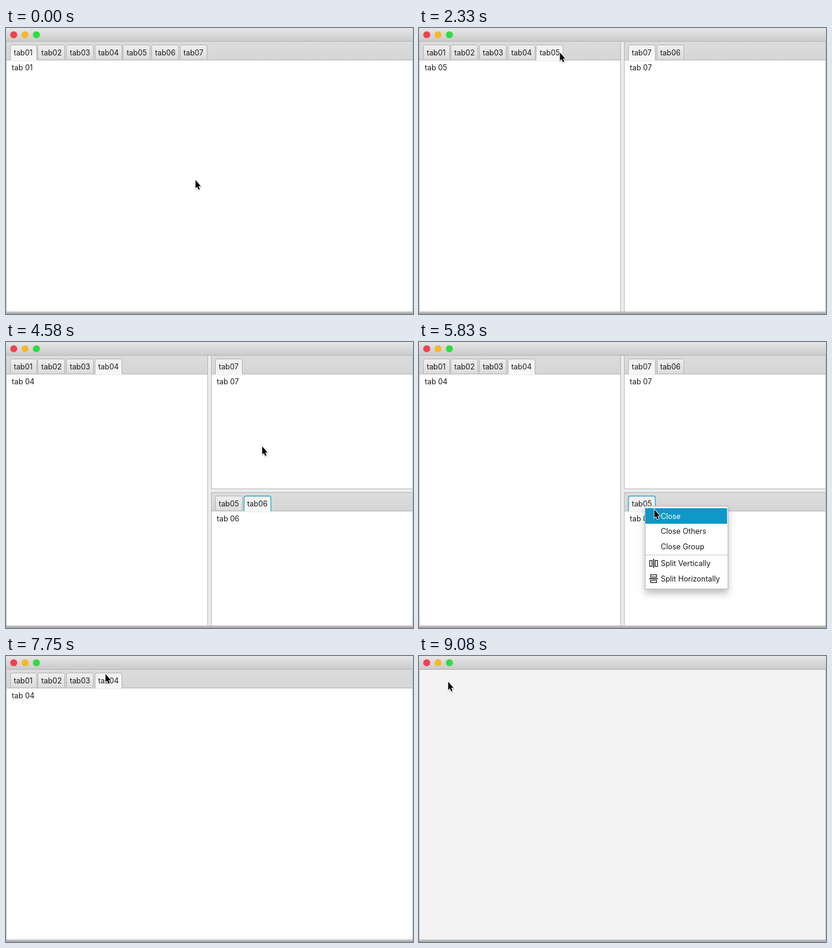
An HTML page with a canvas that plays this animation: 683 px wide and 480 px high, repeating every 9510 ms.

```html
<!DOCTYPE html>
<html lang="en">
<head>
<meta charset="utf-8">
<title>Tab panes</title>
<style>
  html, body { margin: 0; height: 100%; overflow: hidden; background: #fff; }
  canvas { display: block; }
</style>
</head>
<body>
<canvas id="stage" width="683" height="480"></canvas>
<script>
const ctx = document.getElementById('stage').getContext('2d');
const LOOP = 9510, STEP = 1000 / 12, LAST_STEP = 109;
const FONT = '12.45px Inter, sans-serif';
const BLUE = '#0f97c8', EDGE = '#b6b6b6', INK = '#1a1a1a';

const ITEMS = ['Close', 'Close Others', 'Close Group', 'Split Vertically', 'Split Horizontally'];
const rowMiddle = i => 17 + 25.6 * i + (i > 2 ? 2.8 : 0);

// ---- Layout ----

function paneBox(index, count) {
  const x = index ? 344 : 0;
  return {
    x,
    y: index === 2 ? 252 : 22,
    w: count === 1 ? 683 : 339,
    h: index && count > 2 ? 225 : 455
  };
}

function tabSlots(tabs, box) {
  let x = box.x + 7;
  return [...tabs].map(id => {
    const pitch = id === '1' ? 46.3 : 47.7;
    const slot = { id, x, w: pitch - 1.8 };
    x += pitch;
    return slot;
  });
}

// ---- Story: each action changes the state and adds a key for the pointer ----

const keys = [];
let panes = [{ tabs: '1234567', selected: '1' }];
let focus = -1, menu = null;

function move(t, x, y) {
  keys.push({ t, x, y, focus, menu, panes: panes.map(p => ({ ...p })) });
}

function removeTab(pane, id) {
  const at = pane.tabs.indexOf(id);
  pane.tabs = pane.tabs.replace(id, '');
  if (pane.selected === id) pane.selected = pane.tabs[Math.max(0, at - 1)];
}

function press(t, index, id) {
  const box = paneBox(index, panes.length);
  const slot = tabSlots(panes[index].tabs, box).find(s => s.id === id);
  panes[index].selected = id;
  focus = index;
  move(t, slot.x + 24, box.y + 20);
}

function drag(start, end, id, from, to) {
  press(start, from, id);
  const box = paneBox(to, panes.length);
  const x = box.x + 30 + 47.7 * panes[to].tabs.length;
  removeTab(panes[from], id);
  panes[to].tabs += id;
  focus = -1;
  move(end, x, box.y + 20);
}

function openMenu(t, index, id, x, y) {
  focus = index;
  menu = { x, y, id };
  move(t, x, y);
}

function choose(t, item) {
  const { x, y, id } = menu, pane = panes[focus], row = ITEMS.indexOf(item);
  if (item === 'Close Others') {
    pane.tabs = pane.selected = id;
  } else if (item === 'Close Group') {
    pane.tabs = '';
  } else {
    removeTab(pane, id);
    if (item.startsWith('Split')) panes.push({ tabs: id, selected: id });
  }
  panes = panes.filter(p => p.tabs);
  focus = -1;
  menu = null;
  move(t, x + 18, y + rowMiddle(row) - 9);
}

move(0, 318, 256);
openMenu(910, 0, '7', 306, 50);
move(1240, 329, 141);
choose(1410, 'Split Vertically');
drag(1660, 1990, '6', 0, 1);
drag(2410, 2740, '5', 0, 1);
openMenu(2910, 1, '5', 471, 42);
move(3330, 499, 117);
choose(3660, 'Split Horizontally');
drag(3910, 4240, '6', 1, 2);
press(4330, 2, '6');
move(4580, 430, 176);
move(4750, 432, 170);
move(4910, 432, 170);
drag(5080, 5320, '6', 2, 1);
openMenu(5560, 2, '5', 379, 275);
choose(5910, 'Close');
openMenu(6490, 1, '6', 424, 42);
move(6660, 448, 100);
move(6910, 448, 100);
choose(7070, 'Close Group');
move(7740, 167, 31);
openMenu(7910, 0, '4', 165, 35);
choose(8240, 'Close Others');
openMenu(8660, 0, '4', 31, 36);
choose(8990, 'Close');

// ---- Drawing ----

function rect(x, y, w, h, color) {
  ctx.fillStyle = color;
  ctx.fillRect(x, y, w, h);
}

function shade(y0, y1, from, to) {
  const g = ctx.createLinearGradient(0, y0, 0, y1);
  g.addColorStop(0, from);
  g.addColorStop(1, to);
  return g;
}

function label(text, x, middle, color = INK) {
  ctx.fillStyle = color;
  ctx.fillText(text, x, middle + 4.5);
}

function drawWindow() {
  rect(0, 0, 683, 480, '#f3f3f3');
  rect(0, 0, 683, 22, shade(0, 22, '#e6e6e6', '#cbcbcb'));
  rect(0, 22, 683, 1, '#ababab');
  ['#ee4350', '#f5b731', '#30db43'].forEach((color, i) => {
    ctx.fillStyle = color;
    ctx.beginPath();
    ctx.arc(13 + 19 * i, 11.3, 5.9, 0, 7);
    ctx.fill();
  });
}

function drawWindowEdges() {
  rect(0, 22, 1, 455, '#bcbcbc');
  rect(682, 22, 1, 455, '#bcbcbc');
  rect(0, 476, 683, 1, '#aaa');
  rect(0, 477, 683, 3, shade(477, 480, '#d4d4d4', '#929292'));
}

function drawTab({ id, x, w }, y, selected, focused) {
  const bottom = y + (selected ? 25.5 : 24);
  const left = Math.round(x) + 0.5, right = Math.round(x + w) - 0.5;
  ctx.beginPath();
  ctx.moveTo(left, bottom);
  ctx.arcTo(left, y, right, y, 3);
  ctx.arcTo(right, y, right, bottom, 3);
  ctx.lineTo(right, bottom);
  ctx.fillStyle = selected ? shade(y, bottom, '#f0f0f0', '#f8f8f8') : shade(y, bottom, '#efefef', '#dcdcdc');
  ctx.fill();
  ctx.strokeStyle = focused ? '#35a5cc' : '#b2b2b2';
  ctx.lineWidth = focused ? 1.4 : 1;
  ctx.stroke();
  label('tab0' + id, x + 6, y + 13);
}

function drawPane({ tabs, selected }, { x, y, w, h }, focused) {
  rect(x, y, w, h, '#fff');
  rect(x, y, w, 31, shade(y, y + 31, '#dcdcdc', '#d6d6d6'));
  rect(x, y + 31, w, 1, EDGE);
  rect(x, y + 32, w, 3, shade(y + 32, y + 35, '#ededed', '#fff'));
  ctx.strokeStyle = EDGE;
  ctx.lineWidth = 1;
  ctx.strokeRect(x + 0.5, y + 0.5, w - 1, h - 1);
  for (const slot of tabSlots(tabs, { x })) {
    const active = slot.id === selected;
    drawTab(slot, y + 6.5, active, active && focused);
  }
  label('tab 0' + selected, x + 9.8, y + 44.7);
}

function drawSplitIcon(cx, cy, turned) {
  ctx.save();
  ctx.translate(cx, cy);
  if (turned) ctx.rotate(Math.PI / 2);
  rect(-0.8, -7.5, 1.6, 15, '#111');
  ctx.strokeStyle = '#111';
  ctx.lineWidth = 1.2;
  ctx.strokeRect(-6.5, -5, 3.8, 10);
  ctx.strokeRect(2.7, -5, 3.8, 10);
  ctx.restore();
}

function drawMenu({ x, y }, pointer) {
  ctx.save();
  ctx.shadowColor = 'rgba(0,0,0,.25)';
  ctx.shadowBlur = 11;
  ctx.shadowOffsetY = 7;
  rect(x, y, 140, 140, '#b4b4b4');
  ctx.restore();
  rect(x + 1, y + 1, 138, 138, '#fff');
  rect(x + 1, y + 82, 138, 1, '#c8c8c8');
  ITEMS.forEach((text, i) => {
    const row = y + rowMiddle(i);
    const active = Math.abs(pointer.y - row) < 12.8;
    if (active) rect(x + 1, Math.round(row - 13), 137, 26, BLUE);
    if (i > 2) drawSplitIcon(x + 14.7, row, i === 4);
    label(text, x + 26.7, row, active ? '#fff' : INK);
  });
}

function drawPointer({ x, y }) {
  const arrow = new Path2D('M0 -.8V12.7L2.8 10.2L5 15.2L7.2 14.2L5 9.6H9Z');
  ctx.save();
  ctx.translate(x, y);
  ctx.shadowColor = 'rgba(0,0,0,.3)';
  ctx.shadowBlur = 2;
  ctx.shadowOffsetY = 1;
  ctx.strokeStyle = '#fff';
  ctx.lineWidth = 1.8;
  ctx.stroke(arrow);
  ctx.shadowColor = 'transparent';
  ctx.fillStyle = '#000';
  ctx.fill(arrow);
  ctx.restore();
}

function draw(now) {
  const t = STEP * Math.min(LAST_STEP, Math.floor((now % LOOP + 4) / STEP));
  const state = keys.filter(key => key.t <= t).pop();
  const next = keys.find(key => key.t > t) || state;
  const u = (t - state.t) / (next.t - state.t || 1);
  const k = next === state ? 0 : (1 - Math.cos(Math.PI * u)) / 2;
  const pointer = {
    x: state.x + (next.x - state.x) * k,
    y: state.y + (next.y - state.y) * k
  };
  ctx.font = FONT;
  drawWindow();
  if (state.panes.length) rect(339, 23, 344, 454, '#ededed');
  state.panes.forEach((pane, i) => drawPane(pane, paneBox(i, state.panes.length), i === state.focus));
  drawWindowEdges();
  if (state.menu) drawMenu(state.menu, pointer);
  drawPointer(pointer);
}

const start = performance.now();
function tick() {
  draw(performance.now() - start);
  requestAnimationFrame(tick);
}
tick();
</script>
</body>
</html>
```
